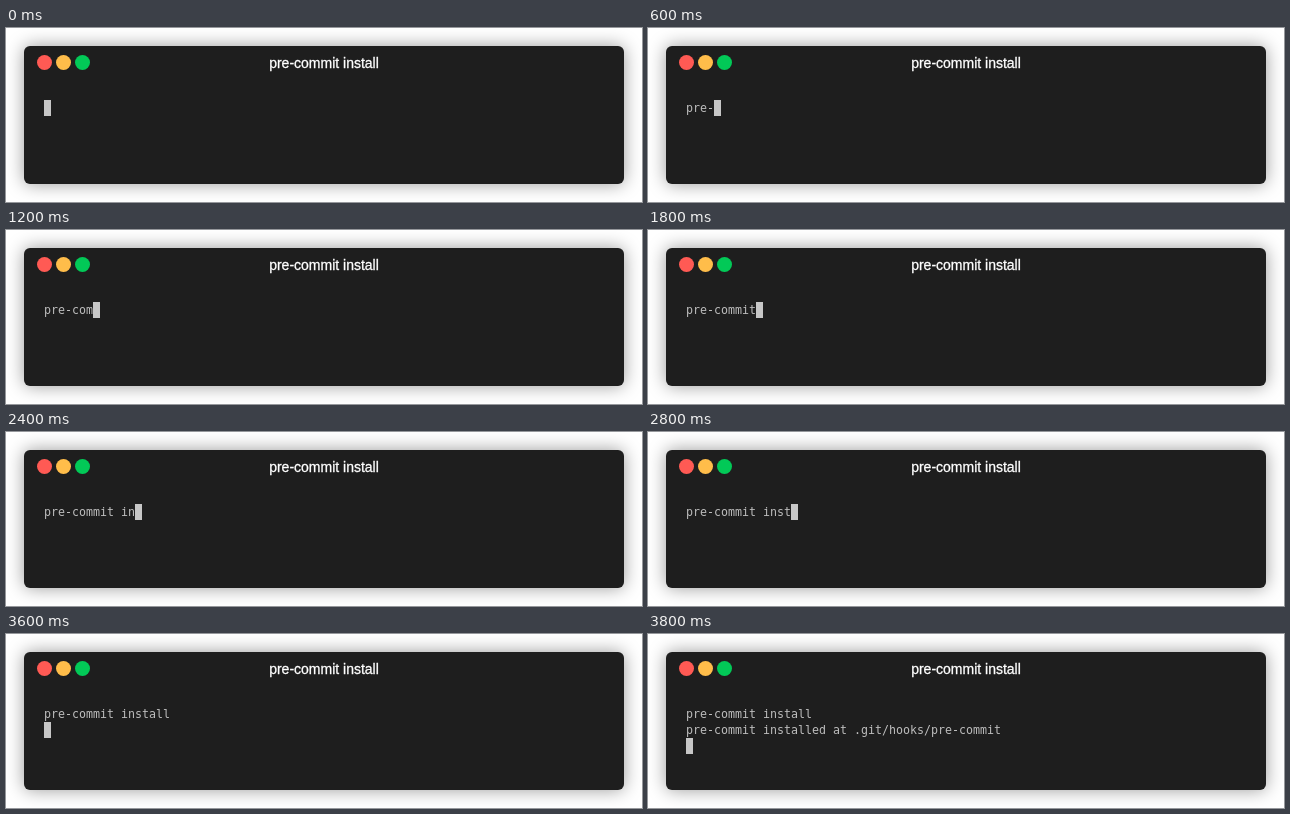
An HTML page with a canvas for the animation above (4000 ms loop, 636 by 174 pixels).

```html
<!DOCTYPE html>
<html lang="en">
<head>
<meta charset="utf-8">
<title>pre-commit install</title>
<style>
  html, body { margin: 0; width: 100%; height: 100%; overflow: hidden; background: #fff; }
  canvas { display: block; }
</style>
</head>
<body>
<canvas id="stage" width="636" height="174"></canvas>
<script>
const ctx = document.getElementById('stage').getContext('2d');
const LOOP = 4000, STEP = 200;
const CELL = { x: 38, y: 72, w: 7, h: 16 };
const COMMAND = 'pre-commit install';
const OUTPUT = 'pre-commit installed at .git/hooks/pre-commit';

function drawWindow() {
  ctx.fillStyle = '#fff';
  ctx.fillRect(0, 0, 636, 174);

  ctx.save();
  ctx.shadowColor = 'rgba(0, 0, 0, 0.4)';
  ctx.shadowBlur = 18;
  ctx.fillStyle = '#1e1e1e';
  ctx.beginPath();
  ctx.roundRect(18, 18, 600, 138, 6);
  ctx.fill();
  ctx.restore();

  ['#ff5a54', '#ffbd4a', '#02c957'].forEach((color, i) => {
    ctx.fillStyle = color;
    ctx.beginPath();
    ctx.arc(38.5 + 19 * i, 34.5, 7.5, 0, Math.PI * 2);
    ctx.fill();
  });

  ctx.font = '14px "Liberation Sans", Arial, sans-serif';
  ctx.textAlign = 'center';
  ctx.fillStyle = '#fff';
  ctx.fillText(COMMAND, 318, 40);
  // slight weight, as with smoothed light text on dark
  ctx.strokeStyle = '#fff';
  ctx.lineWidth = 0.3;
  ctx.strokeText(COMMAND, 318, 40);
}

function drawLine(text, row) {
  ctx.font = '11.63px "DejaVu Sans Mono", monospace';
  ctx.textAlign = 'left';
  ctx.fillStyle = '#bdbdbd';
  [...text].forEach((ch, i) => {
    ctx.fillText(ch, CELL.x + i * CELL.w, CELL.y + row * CELL.h + 12);
  });
}

function drawCursor(col, row) {
  ctx.fillStyle = '#c7c7c7';
  ctx.fillRect(CELL.x + col * CELL.w, CELL.y + row * CELL.h, CELL.w, CELL.h);
}

function draw(now) {
  const step = Math.floor((now % LOOP) / STEP + 1e-6);
  const typed = step ? Math.min(step + 1, COMMAND.length) : 0;

  drawWindow();
  drawLine(COMMAND.slice(0, typed), 0);
  if (step < 18) drawCursor(typed, 0);
  else if (step === 18) drawCursor(0, 1);
  else {
    drawLine(OUTPUT, 1);
    drawCursor(0, 2);
  }
}

const start = performance.now();
function tick() {
  draw(performance.now() - start);
  requestAnimationFrame(tick);
}
tick();
</script>
</body>
</html>
```
